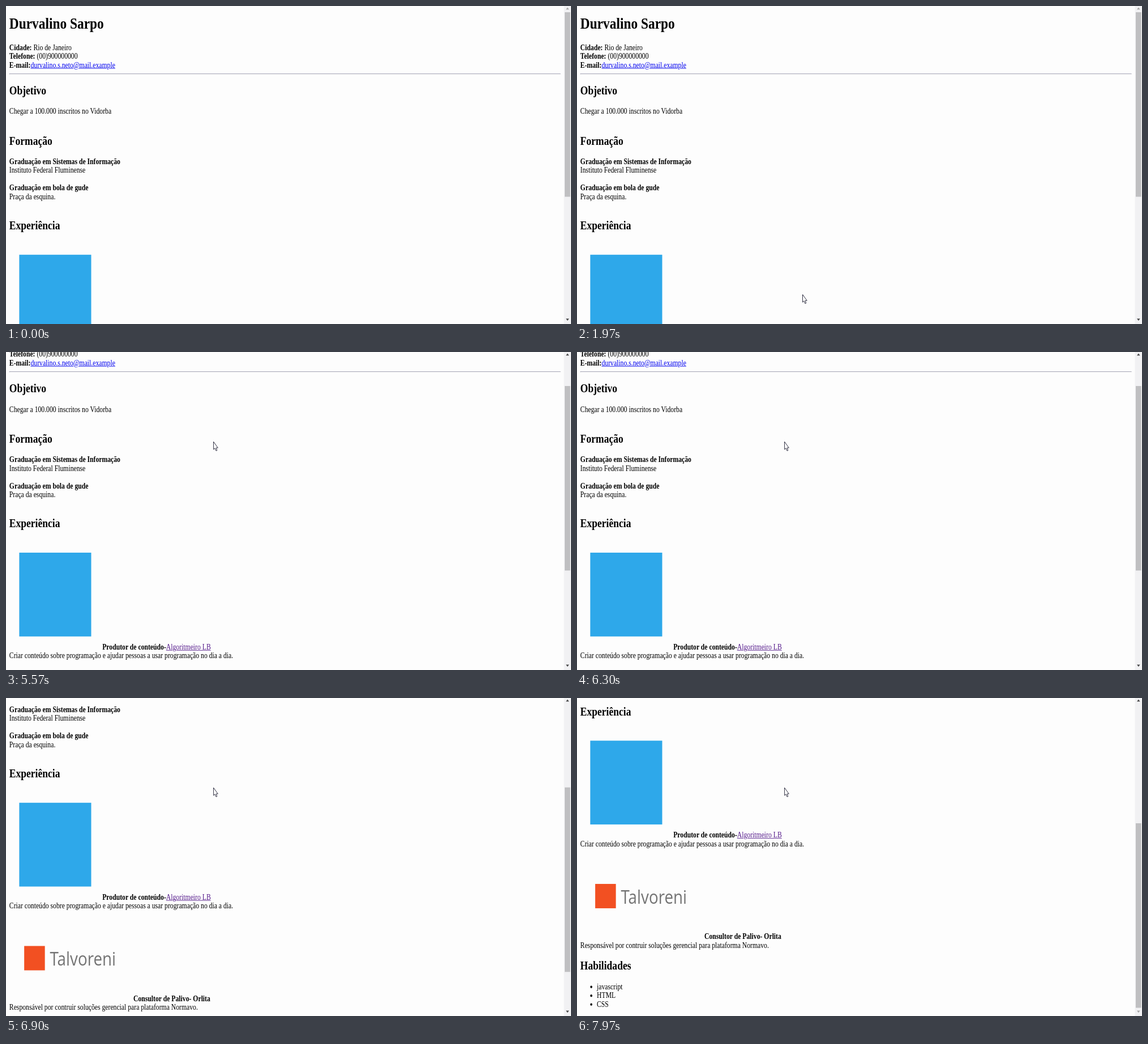
Recreate the animation shown at these times as an HTML page. Size 998 px wide and 561 px high, loop 8 s.

```html
<!DOCTYPE html>
<html lang="pt-BR">
<head>
<meta charset="utf-8">
<title>Currículo</title>
<style>
  html, body { margin: 0; width: 100%; height: 100%; overflow: hidden; background: #fdfdfd; }
  #stage { position: absolute; left: 0; top: 0; width: 998px; height: 561px; overflow: hidden; }
  #scroll { position: absolute; left: 0; top: 0; }

  /* The page is laid out at 1349 px wide and shown scaled down. */
  #page {
    position: absolute; left: 0; top: -3.4px;
    width: 1333px; padding: 21.44px 8px 16px;
    transform: scale(.7306, .8595); transform-origin: 0 0;
    font: 16px/18px "Liberation Serif", "Times New Roman", serif; color: #000;
  }
  h1 { font-size: 32px; line-height: 37px; margin: 0 0 21.44px; }
  h2 { font-size: 24px; line-height: 27px; margin: 19.92px 0; }
  hr { margin: 8px 0; border: 1px solid #eee; border-top-color: #9696ac; border-left-color: #9696ac; }
  ul { margin: 16px 0 0; padding-left: 40px; }
  a { color: #00e; text-decoration: underline; }
  a.seen { color: #551a8b; }
  .logo text { font: 500 38px "Open Sans", sans-serif; fill: #737373; }

  #bar, #cursor { position: absolute; left: 0; top: 0; }
</style>
</head>
<body>
<div id="stage">
  <div id="scroll"><div id="page">
    <h1>Durvalino Sarpo</h1>
    <div>
      <b>Cidade:</b> Rio de Janeiro<br>
      <b>Telefone:</b> (00)900000000<br>
      <b>E-mail:</b><a>durvalino.s.neto@mail.example</a>
    </div>
    <hr>
    <h2>Objetivo</h2>
    <div>Chegar a 100.000 inscritos no Vidorba<br><br></div>
    <h2>Formação</h2>
    <div>
      <b>Graduação em Sistemas de Informação</b><br>
      Instituto Federal Fluminense<br><br>
      <b>Graduação em bola de gude</b><br>
      Praça da esquina.<br><br>
    </div>
    <h2>Experiência</h2>
    <div>
      <svg class="logo" width="225" height="225"><rect x="24" y="26" width="174" height="172" fill="#2ea8ea"/></svg><b>Produtor de conteúdo-</b><a class="seen">Algoritmeiro LB</a><br>
      Criar conteúdo sobre programação e ajudar pessoas a usar programação no dia a dia.<br><br>
      <svg class="logo" width="300" height="168"><rect x="36" y="55" width="50" height="50" fill="#f25022"/><text x="98" y="95.5">Talvoreni</text></svg><b>Consultor de Palivo- Orlita</b><br>
      Responsável por contruir soluções gerencial para plataforma Normavo.
    </div>
    <h2>Habilidades</h2>
    <ul><li>javascript</li><li>HTML</li><li>CSS</li></ul>
  </div></div>

  <svg id="bar" width="998" height="561">
    <rect x="985.5" width="12.5" height="561" fill="#f1f1f3"/>
    <rect id="thumb" x="987" y="11" width="9.6" height="325.5" fill="#bfbfc1"/>
    <path id="up" d="M989 6.2h5.6l-2.8-3.6z"/>
    <path id="down" d="M989 551.6h5.6l-2.8 3.6z"/>
  </svg>

  <svg id="cursor" width="12" height="20">
    <path d="M.6 .8V14.4L3 12.2L5 16.8L6.8 16L5 11.6H8.3Z" fill="#fff" stroke="#1c1c30" stroke-width=".9"/>
  </svg>
</div>
<script>
  const LOOP = 8000, END = 363.5, TRAVEL = 210;
  // [time, scroll offset]: each wheel notch lands at once.
  const notches = [[0, 0], [5570, 84.8], [6470, 169.4], [6870, 254], [7270, 338.6], [7570, END]];
  const move = { start: 1970, stop: 2630, from: [398, 509], to: [366, 157.5] };
  const el = id => document.getElementById(id);
  const [scroll, thumb, up, down, cursor] = ["scroll", "thumb", "up", "down", "cursor"].map(el);
  const arrow = on => on ? "#484848" : "#a6a6a6";

  function draw(t) {
    const y = notches.filter(n => n[0] <= t).pop()[1];
    scroll.style.transform = `translateY(${-y}px)`;
    thumb.setAttribute("y", 11 + TRAVEL * y / END);
    up.setAttribute("fill", arrow(y > 0));
    down.setAttribute("fill", arrow(y < END));

    const p = Math.min(1, Math.max(0, (t - move.start) / (move.stop - move.start)));
    const ease = Math.sin(p * Math.PI / 2);
    const [cx, cy] = move.from.map((v, i) => v + (move.to[i] - v) * ease);
    cursor.style.visibility = t < move.start ? "hidden" : "visible";
    cursor.style.transform = `translate(${cx}px, ${cy}px)`;
  }

  function tick() {
    draw(performance.now() % LOOP);
    requestAnimationFrame(tick);
  }
  tick();
</script>
</body>
</html>
```
